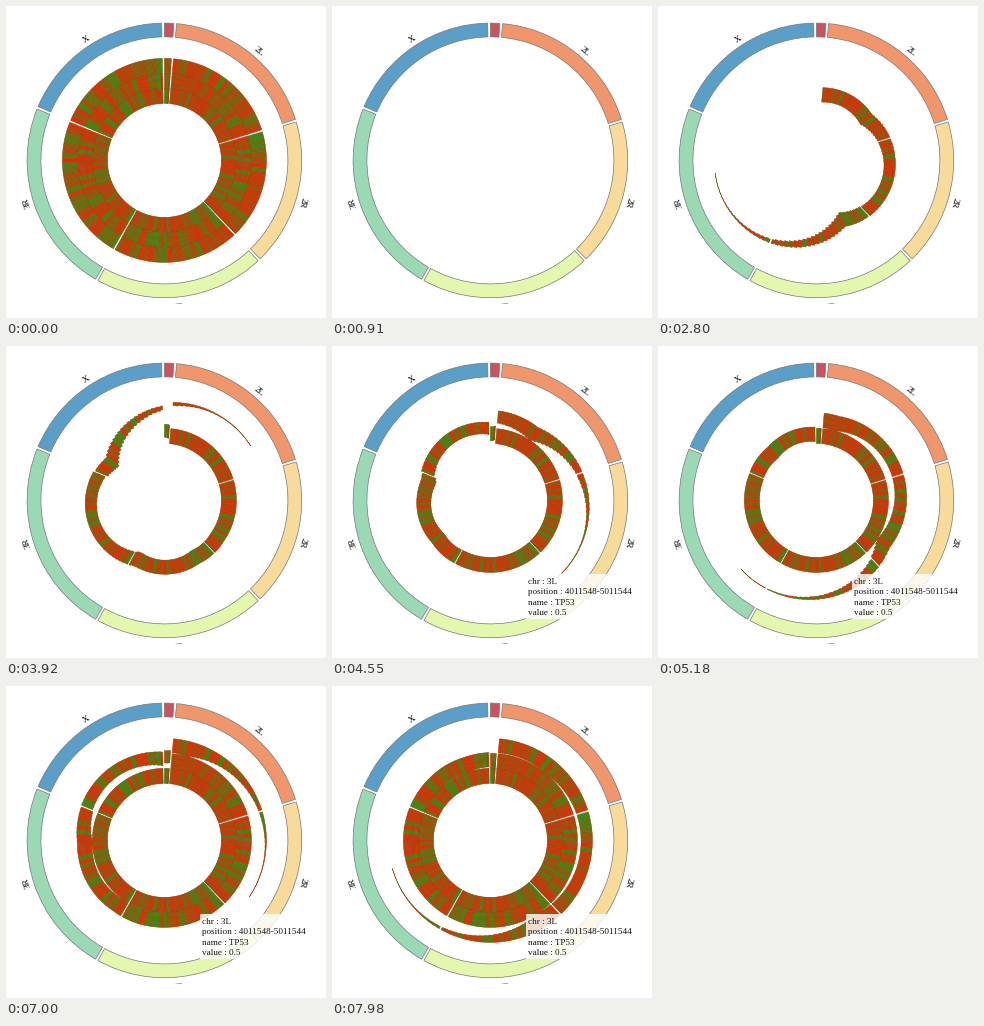
These frames come from a looping animation (320x312 px, 8000 ms). A matplotlib script:

```python
import math
import random

import numpy as np
import matplotlib.pyplot as plt
from matplotlib.animation import FuncAnimation
from matplotlib.collections import PolyCollection
from matplotlib.patches import Rectangle, Wedge

W, H, DPI = 320, 312, 100
CX, CY = 158.4, 154.4
LOOP, TICK = 8000, 40
CLEAR, START = 560, 938        # old rings vanish, first cell departs (ms)
STEP, FALL = 21.26, 2126       # delay per cell, travel time of a cell (ms)
PAD = 1.15                     # gap between chromosomes, degrees
RIM, CORE, BAND = 102, 57, 15
TIP_AT = 4480

# ring order, clockwise from the top: length in Mb and fill
RING = {
    "4": (1.35, "#c9535f"),
    "2L": (23.01, "#f0966c"),
    "2R": (21.15, "#f8db9b"),
    "3L": (24.54, "#e3f7ae"),
    "3R": (27.90, "#9bd9b5"),
    "X": (22.42, "#5b9fc8"),
}
DATA_ORDER = ["2L", "2R", "3L", "3R", "4", "X"]
RED = np.array([217, 51, 6]) / 255
GREEN = np.array([70, 134, 18]) / 255

rng = random.Random(12)


def px(size):
    return size * 72 / DPI


def polar(r, deg):
    a = np.radians(deg)
    return CX + r * np.sin(a), CY - r * np.cos(a)


def bounce(t):
    t = np.clip(t, 0, 1)
    k = 7.5625
    return np.select(
        [t < 4 / 11, t < 8 / 11, t < 10 / 11],
        [k * t ** 2, k * (t - 6 / 11) ** 2 + 0.75, k * (t - 9 / 11) ** 2 + 0.9375],
        k * (t - 10.5 / 11) ** 2 + 0.984375)


def layout():
    scale = (360 - PAD * len(RING)) / sum(n for n, _ in RING.values())
    spans, pos = {}, 0.0
    for name, (length, _) in RING.items():
        spans[name] = (pos, pos + length * scale)
        pos += length * scale + PAD
    return spans, scale


def build_cells(spans, scale):
    """Each megabase cell is two stripes sharing one delay."""
    rows, shades = [], []
    order = 0
    for track in range(3):
        for name in DATA_ORDER:
            lo, hi = spans[name]
            for k in range(math.ceil(RING[name][0] - 0.1)):
                a = lo + k * scale
                b = min(a + scale, hi)
                value = rng.random() ** 1.5
                for half in range(2):
                    left = a + (b - a) * half / 2
                    rows.append((track, order, left, left + (b - a) / 2))
                    v = min(max(value + rng.uniform(-0.15, 0.15), 0), 1)
                    shades.append(RED + (GREEN - RED) * v)
                order += 1
    return np.array(rows), np.array(shades)


fig = plt.figure(figsize=(W / DPI, H / DPI), dpi=DPI, facecolor="white")
ax = fig.add_axes([0, 0, 1, 1])
ax.set_xlim(0, W)
ax.set_ylim(H, 0)
ax.axis("off")

spans, scale = layout()
cells, shades = build_cells(spans, scale)
track, order, left, right = cells.T

for name, (lo, hi) in spans.items():
    ax.add_patch(Wedge((CX, CY), 137.3, lo - 90, hi - 90, width=13.8,
                       fc=RING[name][1], ec="#777777", lw=0.5))
    if name != "4":
        mid = (lo + hi) / 2
        x, y = polar(141.7, mid)
        ax.text(x, y, name, family="Liberation Serif", size=px(9.1),
                color="black", rotation=-mid, rotation_mode="anchor",
                ha="left", va="baseline")
# the drawing area ends here and cuts the lowest label
ax.add_patch(Rectangle((0, 297.5), W, H - 297.5, fc="white", ec="none", zorder=5))

heat = PolyCollection([], linewidths=0.35, zorder=3)
ax.add_collection(heat, autolim=False)

tip = [ax.add_patch(Rectangle((193.5, 228), 109, 44.5, fc="white", ec="none",
                              alpha=0.82, zorder=6))]
for i, line in enumerate(["chr : 3L", "position : 4011548-5011544",
                          "name : TP53", "value : 0.5"]):
    tip.append(ax.text(196, 238 + 10.4 * i, line, family="Liberation Serif",
                       size=px(9.1), color="#111111", va="baseline", zorder=7))


def update(i):
    t = i * TICK
    if t < CLEAR:
        age = np.ones(len(cells))
    else:
        age = (t - START - order * STEP) / FALL
    on = age > 0
    p = bounce(age[on])
    floor = CORE + BAND * track[on]
    inner = RIM + (floor - RIM) * p
    outer = RIM + (floor + BAND - RIM) * p
    a, b = left[on], right[on]
    corners = [polar(inner, a), polar(outer, a), polar(outer, b), polar(inner, b)]
    heat.set_verts(np.array(corners).transpose(2, 0, 1) if on.any() else [])
    heat.set_facecolor(shades[on])
    heat.set_edgecolor(shades[on] * 0.86)
    for part in tip:
        part.set_visible(t >= TIP_AT)
    return [heat, *tip]


anim = FuncAnimation(fig, update, frames=LOOP // TICK, interval=TICK,
                     repeat=True, repeat_delay=0, blit=False)
plt.show()
```
